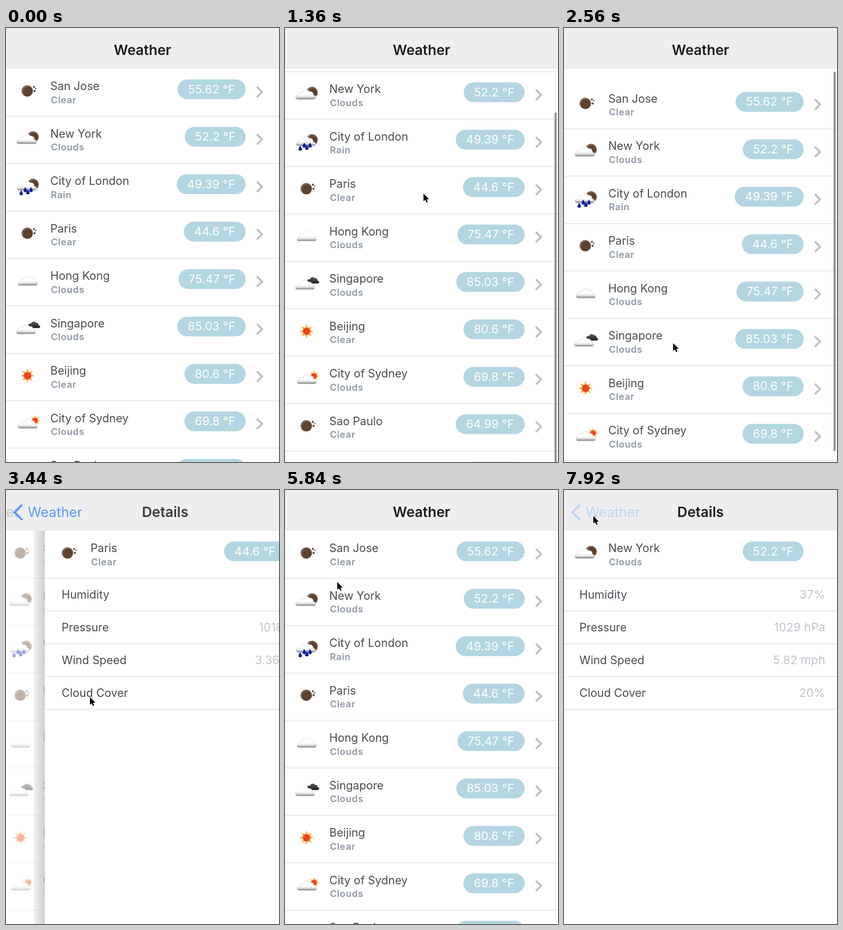
An HTML page for the animation above (8000 ms loop, 475 by 755 pixels).

```html
<!DOCTYPE html>
<html lang="en">
<head>
<meta charset="utf-8">
<title>Weather list</title>
<style>
  html, body { margin: 0; width: 100%; height: 100%; overflow: hidden; background: #fff; }
  svg { display: block; width: 475px; height: 755px; font-family: Inter, Roboto, sans-serif; }
  .name { font-size: 19.7px; fill: #484b51; }
  .sky { font-size: 16.3px; font-weight: 600; letter-spacing: .55px; fill: #8d98a3; }
  .temp { font-size: 20.6px; fill: #fff; text-anchor: middle; }
  .value { font-size: 20.5px; fill: #c2c5cc; text-anchor: end; }
  .title { font-size: 24.4px; font-weight: 600; fill: #1d1d20; text-anchor: middle; }
  .back { font-size: 23.9px; fill: #3f8df6; }
</style>
</head>
<body>
<svg id="stage" viewBox="0 0 475 755" xmlns="http://www.w3.org/2000/svg"></svg>
<script>
const LOOP = 8000, W = 475, TOP = 71, ROW = 82.5;

// name, sky, temperature, pill left edge, icon
const CITIES = [
  ['San Jose', 'Clear', '55.62', 298.5, 'night'],
  ['New York', 'Clouds', '52.2', 311, 'nightCloud'],
  ['City of London', 'Rain', '49.39', 297, 'rain'],
  ['Paris', 'Clear', '44.6', 309.5, 'night'],
  ['Hong Kong', 'Clouds', '75.47', 300, 'cloudy'],
  ['Singapore', 'Clouds', '85.03', 298, 'broken'],
  ['Beijing', 'Clear', '80.6', 310.5, 'day'],
  ['City of Sydney', 'Clouds', '69.8', 310.5, 'dayCloud'],
  ['Sao Paulo', 'Clear', '64.99', 297, 'night'],
  ['Cairo', 'Clear', '78.8', 311, 'day']
];
const LABELS = ['Humidity', 'Pressure', 'Wind Speed', 'Cloud Cover'];
const PARIS = ['87%', '1018 hPa', '3.36 mph', '0%'];
const NEW_YORK = ['37%', '1029 hPa', '5.82 mph', '20%'];

// [start, opening?]
const PUSHES = [[3273, true], [5080, false], [6310, true]];
const PRESSES = [[4880, 5080], [7920, 8000]];
const SCROLL = [[320, 0], [960, 88], [1360, 77.4], [2080, -84.6], [2800, 0]];
const POINTER = [
  [320, 246, 372], [960, 242, 268], [1360, 241, 288], [2080, 205, 611],
  [2320, 203, 604], [2880, 170, 463], [3120, 146, 360], [4360, 146, 360],
  [4800, 62, 58], [5500, 62, 58], [5840, 91, 160], [6080, 94, 182],
  [6160, 94.5, 184], [7300, 94.5, 184], [7760, 51, 45]
];

const text = (cls, x, y, str) => `<text class="${cls}" x="${x}" y="${y}">${str}</text>`;
const line = y => `<rect y="${y}" width="${W}" height=".65" fill="#c6c6ca"/>`;
const use = (id, x, y, scale = 1) =>
  `<use href="#${id}" transform="translate(${x} ${y}) scale(${scale})"/>`;

function star(rays, outer, inner) {
  return Array.from({ length: rays * 2 }, (_, i) => {
    const r = i % 2 ? inner : outer, a = i * Math.PI / rays;
    return `${(r * Math.sin(a)).toFixed(2)},${(-r * Math.cos(a)).toFixed(2)}`;
  }).join(' ');
}

const CLOUD = 'M3.500 20a3.500 3.500 0 0 1 0-7C4 9.500 8 8 11 9C13 2.500 21 1.500 24 6.500C28 5.500 31 8.500 31 13h.500a3.500 3.500 0 0 1 0 7z';
const drop = (x, y) => `<path d="M${x} ${y}c4 5 4 8.500 0 8.500s-4-3.500 0-8.500z" fill="#101e9c"/>`;

const ICONS = {
  night: use('moon', 37, 38.5) +
    '<g fill="#67503f"><circle cx="48.500" cy="31.500" r="1.800"/><circle cx="51.800" cy="34" r="1.200"/><circle cx="49.800" cy="38.500" r="1.900"/></g>',
  nightCloud: use('moon', 47, 36) + use('cloud', 18.500, 28),
  rain: use('moon', 47, 36) + use('cloud', 19, 27, .97) +
    drop(26.500, 46.500) + drop(33.500, 41) + drop(38, 45) + drop(43.500, 41),
  cloudy: use('cloud', 21, 27.500, .97),
  broken: use('darkCloud', 36, 25, .67) + use('cloud', 18, 29.500, .96),
  day: use('sun', 37.500, 39),
  dayCloud: use('sun', 50.500, 34.500, .75) + use('cloud', 21, 28.500, .97)
};

const DEFS = `<defs>
  <radialGradient id="brown" cx=".56" cy=".56" r=".62">
    <stop offset="0" stop-color="#664630"/><stop offset=".55" stop-color="#5a3f2d"/><stop offset="1" stop-color="#958070"/>
  </radialGradient>
  <linearGradient id="white" x2="0" y2="1">
    <stop offset=".5" stop-color="#fff"/><stop offset=".75" stop-color="#e4e4e4"/><stop offset="1" stop-color="#777"/>
  </linearGradient>
  <linearGradient id="dark" x2="0" y2="1">
    <stop offset="0" stop-color="#5a5a5c"/><stop offset="1" stop-color="#202022"/>
  </linearGradient>
  <linearGradient id="shade">
    <stop offset="0" stop-opacity=".04"/><stop offset=".3" stop-opacity=".09"/><stop offset="1" stop-opacity=".2"/>
  </linearGradient>
  <circle id="moon" r="10" fill="url(#brown)"/>
  <path id="cloud" d="${CLOUD}" fill="url(#white)" stroke="#c4c4c4" stroke-width=".5"/>
  <path id="darkCloud" d="${CLOUD}" fill="url(#dark)"/>
  <g id="sun"><polygon points="${star(8, 12.5, 6.5)}" fill="#f7ab4c"/><circle r="6.200" fill="#ec421e"/></g>
</defs>`;

function cityRow([name, sky, temp, left, icon]) {
  return ICONS[icon] + text('name', 77, 37, name) + text('sky', 78, 59.5, sky) +
    `<rect x="${left}" y="18.500" width="${417 - left}" height="34.500" rx="17.250" fill="#b4d6e2"/>` +
    text('temp', (left + 417) / 2, 42.7, temp + ' °F') + line(82.1);
}

function listRow(city, i) {
  return `<g transform="translate(0 ${TOP + i * ROW})">${cityRow(city)}
    <path d="M436.500 31.200l9 9-9 9" fill="none" stroke="#c0c1c6" stroke-width="3.500"/></g>`;
}

function details(city, values) {
  return `<g transform="translate(0 ${TOP})">${cityRow(city)}</g>` +
    LABELS.map((label, i) => text('name', 26.8, 189 + 57 * i, label) +
      text('value', 454.5, 189 + 57 * i, values[i]) + line(210.1 + 57 * i)).join('');
}

const stage = document.getElementById('stage');
stage.innerHTML = `${DEFS}
  <rect width="475" height="755" fill="#fff"/>
  <g id="list">
    <g id="rows">${CITIES.map(listRow).join('')}</g>
    <rect id="bar" x="469" width="3.600" rx="1.800" fill="#8f8f93"/>
  </g>
  <g id="card">
    <rect x="-22" y="71" width="20" height="684" fill="url(#shade)"/>
    <rect x="-2.500" y="71" width="477.500" height="684" fill="#fff"/>
    <g id="first">${details(CITIES[3], PARIS)}</g>
    <g id="second">${details(CITIES[1], NEW_YORK)}</g>
  </g>
  <rect width="475" height="71" fill="#eeeef0"/>
  <g id="home">${text('title', 237.5, 47.3, 'Weather')}</g>
  <g id="inner">${text('title', 237.5, 47.3, 'Details')}</g>
  <g id="back">
    <path d="M28 25.500L14.800 38.700L28 52" fill="none" stroke="#3f8df6" stroke-width="3.600"/>
    ${text('back', 38, 47.2, 'Weather')}
  </g>
  <path id="pointer" d="M0 0V13.500L3.100 10.800L5.200 15.600L7.500 14.600L5.400 9.900H9.500Z" fill="#000" stroke="#fff" stroke-width="1" paint-order="stroke"/>`;

const parts = {};
stage.querySelectorAll('g[id], #bar, #pointer').forEach(el => parts[el.id] = el);

const clamp = v => Math.max(0, Math.min(1, v));
const bezier = (s, a, b) => 3 * s * (1 - s) ** 2 * a + 3 * s * s * (1 - s) * b + s ** 3;

function ease(x) {
  let lo = 0, hi = 1;
  for (let i = 0; i < 24; i++) {
    const mid = (lo + hi) / 2;
    if (bezier(mid, .2833, .31833) < x) lo = mid; else hi = mid;
  }
  return bezier(lo, .99, .99);
}

// Smooth interpolation of [time, ...values] keys
function sample(keys, t) {
  if (t <= keys[0][0]) return keys[0].slice(1);
  const i = keys.findIndex(k => k[0] > t);
  if (i < 0) return keys[keys.length - 1].slice(1);
  const a = keys[i - 1], b = keys[i];
  const u = (t - a[0]) / (b[0] - a[0]), k = u * u * (3 - 2 * u);
  return a.slice(1).map((v, j) => v + (b[j + 1] - v) * k);
}

function openness(t) {
  let p = 0;
  for (const [start, opening] of PUSHES) {
    if (t < start) break;
    const k = t >= start + 500 ? 1 : ease((t - start) / 500);
    p = opening ? k : 1 - k;
  }
  return p;
}

const move = (el, x, y = 0) => el.setAttribute('transform', `translate(${x} ${y})`);
const fade = (el, v) => el.setAttribute('opacity', v);
const show = (el, on) => el.setAttribute('display', on ? 'inline' : 'none');

function draw(t) {
  const p = openness(t), [scroll] = sample(SCROLL, t);

  move(parts.rows, 0, -scroll);
  move(parts.list, -14.5 * p);
  fade(parts.list, 1 - .7 * p);
  parts.bar.setAttribute('y', 76 + Math.max(scroll, 0) * .915);
  parts.bar.setAttribute('height', 682 + Math.min(scroll, 0));
  fade(parts.bar, clamp((t - 320) / 80) * clamp((3000 - t) / 200));

  show(parts.card, p > 0);
  move(parts.card, W * (1 - p));
  show(parts.first, t < 6000);
  show(parts.second, t >= 6000);

  move(parts.home, -309 * p);
  fade(parts.home, 1 - p);
  move(parts.inner, 267 * (1 - p));
  fade(parts.inner, p);
  const pressed = PRESSES.some(([from, to]) => t >= from && t < to);
  fade(parts.back, p * (pressed ? .25 : 1));

  show(parts.pointer, t >= 320);
  move(parts.pointer, ...sample(POINTER, t));
}

const begin = performance.now();
function tick() {
  draw((performance.now() - begin) % LOOP);
  requestAnimationFrame(tick);
}
draw(0);
requestAnimationFrame(tick);
</script>
</body>
</html>
```
